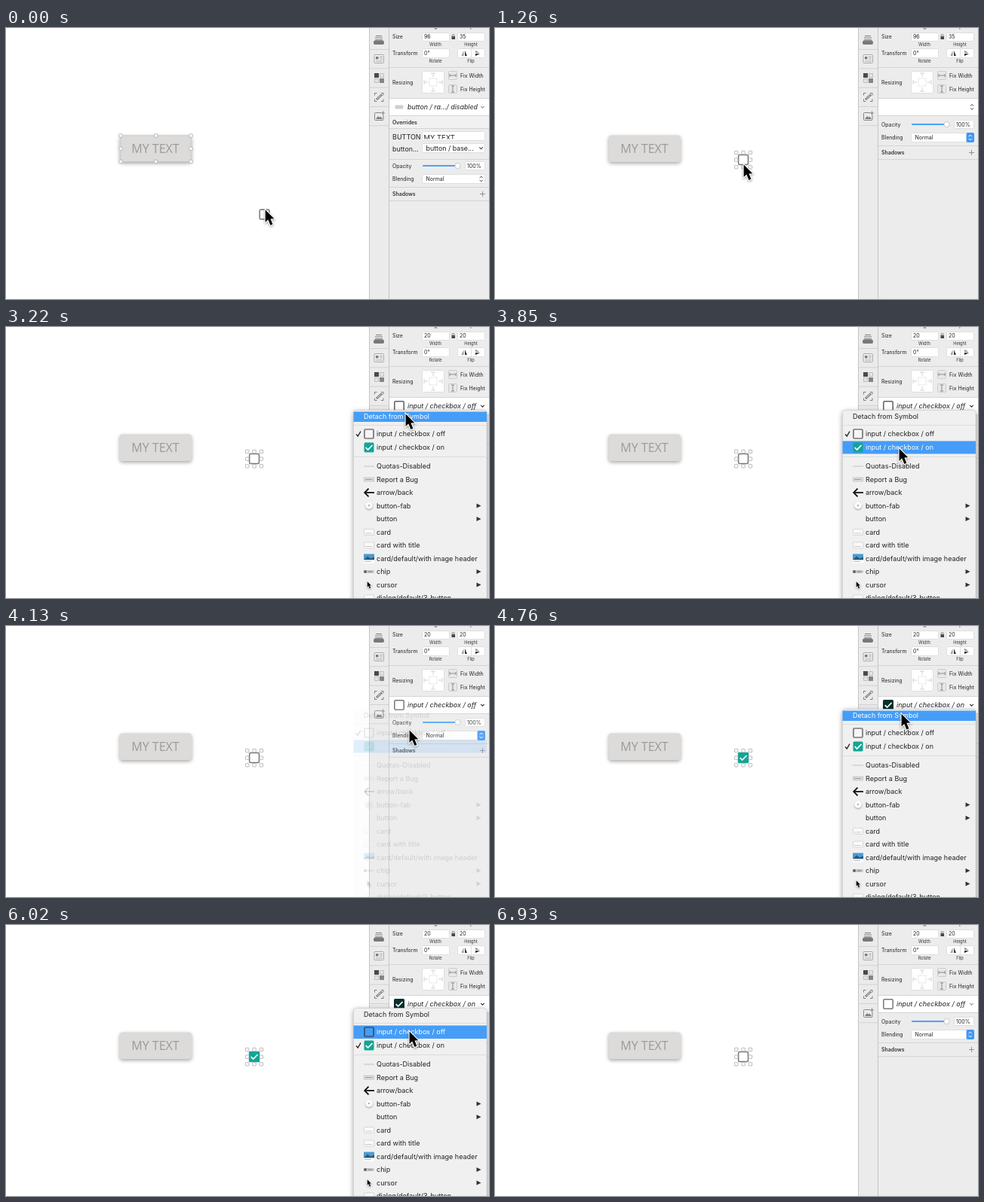
An HTML page with a canvas for the animation above (7000 ms loop, 640 by 360 pixels).

```html
<!DOCTYPE html>
<html lang="en">
<head>
<meta charset="utf-8">
<title>Symbol switching</title>
<style>
html, body { margin: 0; width: 100%; height: 100%; overflow: hidden; background: #fff; }
canvas { display: block; width: 640px; height: 360px; }
</style>
</head>
<body>
<canvas id="stage" width="640" height="360"></canvas>
<script>
const ctx = document.getElementById('stage').getContext('2d');
const LOOP = 7000, STEP = 70;
const TEAL = '#12a594', BLUE = '#459df8', INK = '#222', MID = '#777';

// Pointer tip: time, x, y
const POINTER = [
  [0, 343, 240], [700, 328, 176], [1050, 328, 176], [1190, 329, 180], [1260, 329, 180],
  [1890, 506, 121], [2030, 510, 120], [2590, 533, 103], [3080, 533, 104],
  [3220, 529, 114], [3570, 535, 160], [3850, 535, 160], [4130, 534, 137],
  [4480, 538, 115], [5110, 538, 116], [5250, 537, 126], [5390, 534, 140],
  [6160, 534, 140], [6650, 534, 364], [7000, 534, 364]
];

// Menu rows: center y, label, icon, has submenu
const MENU = [
  [119, 'Detach from Symbol'],
  [142, 'input / checkbox / off', 'off'],
  [160, 'input / checkbox / on', 'on'],
  [185, 'Quotas-Disabled', 'line'],
  [202.5, 'Report a Bug', 'bar'],
  [220, 'arrow/back', 'back'],
  [237.5, 'button-fab', 'fab', true],
  [255, 'button', '', true],
  [272.5, 'card', 'card'],
  [290, 'card with title', 'card'],
  [307.5, 'card/default/with image header', 'image'],
  [325, 'chip', 'chip', true],
  [342.5, 'cursor', 'cursor', true],
  [360, 'dialog/default/3-button', 'card']
];

function between(t, a, b) { return t >= a && t < b; }

function pointerAt(t) {
  const i = POINTER.findIndex(p => p[0] > t);
  const [t0, x0, y0] = POINTER[i - 1], [t1, x1, y1] = POINTER[i];
  const u = (t - t0) / (t1 - t0), k = u * u * (3 - 2 * u);
  return { x: x0 + (x1 - x0) * k, y: y0 + (y1 - y0) * k };
}

function text(str, x, y, size = 6.9, color = INK, style = '', align = 'left', family = 'Inter') {
  ctx.font = `${style} ${size}px ${family}, sans-serif`;
  ctx.fillStyle = color;
  ctx.textAlign = align;
  ctx.textBaseline = 'alphabetic';
  ctx.fillText(str, x, y);
}

function box(x, y, w, h, fill, stroke, r = 0, lw = 1) {
  ctx.beginPath();
  ctx.roundRect(x, y, w, h, r);
  if (fill) { ctx.fillStyle = fill; ctx.fill(); }
  if (stroke) { ctx.strokeStyle = stroke; ctx.lineWidth = lw; ctx.stroke(); }
}

function line(points, color, lw = 1) {
  ctx.beginPath();
  points.forEach(([x, y]) => ctx.lineTo(x, y));
  ctx.strokeStyle = color;
  ctx.lineWidth = lw;
  ctx.stroke();
}

function shape(points, color) {
  ctx.beginPath();
  points.forEach(([x, y]) => ctx.lineTo(x, y));
  ctx.closePath();
  ctx.fillStyle = color;
  ctx.fill();
}

function circle(x, y, r, fill, stroke) {
  ctx.beginPath();
  ctx.arc(x, y, r, 0, Math.PI * 2);
  ctx.fillStyle = fill;
  ctx.fill();
  if (stroke) { ctx.strokeStyle = stroke; ctx.lineWidth = 0.7; ctx.stroke(); }
}

function shadowed(color, blur, dy, draw) {
  ctx.save();
  ctx.shadowColor = color;
  ctx.shadowBlur = blur;
  ctx.shadowOffsetY = dy;
  draw();
  ctx.restore();
}

function field(x, y, w, h, r = 1) { box(x + .5, y + .5, w - 1, h - 1, '#fff', '#dadada', r, .8); }

function checkbox(x, y, on, size = 13.4, color) {
  const h = size / 2;
  if (!on) return box(x - h + .3, y - h + .3, size - .6, size - .6, '#fff', color || MID, 1.5, 1.5);
  box(x - h - .5, y - h - .5, size + 1, size + 1, color || TEAL, null, 1.5);
  line([[x - 4.3, y + .2], [x - 1.4, y + 3.1], [x + 4.5, y - 3]], '#fff', 1.7);
}

function handles(x0, y0, x1, y1) {
  const xs = [x0, (x0 + x1) / 2, x1], ys = [y0, (y0 + y1) / 2, y1];
  xs.forEach((x, i) => ys.forEach((y, j) => {
    if (i !== 1 || j !== 1) box(x - 2.2, y - 2.2, 4.4, 4.4, '#fff', '#aaa', .5, .8);
  }));
}

function arrow(x, y, s = 1) {
  ctx.save();
  ctx.translate(x, y);
  ctx.scale(s, s);
  ctx.beginPath();
  [[.6, 1.4], [.6, 18], [4.3, 14.6], [7.4, 22], [10.4, 20.8], [7.4, 13.4], [12.3, 13.2]]
    .forEach(p => ctx.lineTo(...p));
  ctx.closePath();
  ctx.strokeStyle = '#fff';
  ctx.lineWidth = 2.2;
  shadowed('rgba(0,0,0,.4)', 3, 1, () => ctx.stroke());
  ctx.fillStyle = '#000';
  ctx.fill();
  ctx.restore();
}

function upDown(x, y, color) {
  line([[x - 2, y - 1.3], [x, y - 3.5], [x + 2, y - 1.3]], color);
  line([[x - 2, y + 1.3], [x, y + 3.5], [x + 2, y + 1.3]], color);
}

function chevron(x, y, color) { line([[x - 2.3, y - 1.1], [x, y + 1.2], [x + 2.3, y - 1.1]], color, 1.1); }

function rule(y) { box(508, y, 132, 1, '#d4d4d4'); }

function canvasArea(s) {
  shadowed('rgba(0,0,0,.35)', 5, 2, () => box(150.5, 142.5, 95.5, 35.5, '#dcdbda', null, 4));
  text('MY TEXT', 198, 166.3, 16, '#9a9a9a', '', 'center', '"Open Sans"');
  if (s.buttonSelected) {
    box(152, 143, 93, 34.5, null, '#c4c4c4', 0, .7);
    handles(152, 143, 245, 177.5);
  }
  checkbox(s.box.x, s.box.y, s.on);
  if (!s.buttonSelected) handles(319.7, 165.5, 338.3, 184.8);
}

function toolStrip() {
  box(481, 0, 27, 360, '#ebebeb');
  box(481, 0, 1, 360, '#c6c6c6');
  box(507, 0, 1, 360, '#c6c6c6');
  for (let i = 0; i < 5; i++) box(482, 28 + i * 25.3, 25, 1, '#d2d2d2');
  const c = '#7c7c7c';
  line([[490, 10.5], [498, 10.5]], c);
  line([[489, 13], [499, 13]], c);
  shape([[489.5, 15], [498.5, 15], [500.5, 18], [487.5, 18]], '#999');
  box(487.5, 17.5, 13, 4, '#777', c, 1);

  box(488, 35.5, 12.5, 11, '#f1f1f1', '#a0a0a0', 1, .9);
  box(490, 38, 3.5, 3.5, c);
  [38.5, 41, 44].forEach((y, i) => line([[i < 2 ? 495 : 490, y], [499, y]], '#999', .9));

  box(488, 60, 6, 6, '#4a4a4a');
  box(495.5, 60.5, 5, 5, '#e4e4e4', '#b5b5b5', 0, .8);
  box(488.5, 67.5, 5, 5, '#e4e4e4', '#b5b5b5', 0, .8);
  box(495, 67, 6, 6, '#858585');

  // Corner marks around a pen
  for (const [x, y, dx, dy] of [[488.5, 86.5, 3, 3], [500, 86.5, -3, 3], [488.5, 97.5, 3, -3], [500, 97.5, -3, -3]])
    line([[x + dx, y], [x, y], [x, y + dy]], c);
  line([[491, 95], [498, 88.5]], c, 3);
  line([[492, 94], [497, 89.4]], '#eee', .9);

  box(488.5, 112.5, 11.5, 10, null, c, 1, .9);
  shape([[490, 121], [493, 117], [495, 119], [496.5, 117.5], [499, 121]], c);
  box(497, 110.5, 5, 5, '#ebebeb');
  line([[499.5, 110.5], [499.5, 115.5]], c);
  line([[497, 113], [502, 113]], c);
}

function geometryPanel(size) {
  text('X', 569.5, 2, 5.7, INK, '', 'center');
  text('Y', 616, 2, 5.7, INK, '', 'center');
  text('Size', 512, 14.4);
  field(551, 6, 37, 12);
  field(598, 6, 37, 12);
  text(size[0], 554, 14.4, 7);
  text(size[1], 601, 14.4, 7);
  box(590.5, 11, 4.5, 4, '#444', null, .5);
  box(591.3, 8.5, 2.6, 4, null, '#666', 1.2, .8);
  const label = (s, x, y) => text(s, x, y, 5.7, '#333', '', 'center');
  label('Width', 569, 24.2);
  label('Height', 616, 24.2);
  text('Transform', 512, 36.4);
  field(551, 27, 37, 13);
  text('0°', 554, 36.4, 7);
  field(598, 27, 37, 13, 2);
  line([[616.5, 28], [616.5, 39]], '#e2e2e2');
  shape([[606.5, 30], [606.5, 37], [603.5, 37]], '#999');
  shape([[608, 30], [608, 37], [611, 37]], '#333');
  shape([[622, 29.8], [627.5, 33], [622, 33]], '#999');
  shape([[622, 34], [628, 34], [622, 37.3]], '#333');
  label('Rotate', 569, 46);
  label('Flip', 616, 46);
  rule(52);
  text('Resizing', 512, 74.8);
  field(551, 57, 30, 30);
  ctx.setLineDash([1, 1]);
  box(561, 67, 10, 10, null, '#c8c8c8', 0, .8);
  ctx.setLineDash([]);
  for (let i = 0; i < 4; i++) {
    ctx.save();
    ctx.translate(566, 72);
    ctx.rotate(i * Math.PI / 2);
    line([[0, -12], [0, -7]], '#d2d2d2');
    line([[-3, -12], [3, -12]], '#d2d2d2');
    ctx.restore();
  }
  [63, 81].forEach((y, i) => {
    box(586.5, y - 5.5, 11, 11, '#e8e8e8', '#c4c4c4', 1, .8);
    ctx.save();
    ctx.translate(592, y);
    ctx.rotate(i * Math.PI / 2);
    line([[-4, 0], [4, 0]], MID, .8);
    line([[-4, -2], [-4, 2]], MID, .8);
    line([[4, -2], [4, 2]], MID, .8);
    ctx.restore();
    text(['Fix Width', 'Fix Height'][i], 602, y + 2.8);
  });
}

function symbolRow(s) {
  box(508, 93, 132, 24, '#fff');
  rule(93);
  rule(116);
  if (s.panel === 'loading') return upDown(632, 105, '#444');
  if (s.panel === 'button') {
    box(515.5, 102.5, 11, 5, '#cfcfcf', null, 1);
    text('button / ra.../ disabled', 532, 108.3, 8.9, INK, 'italic');
  } else {
    const dark = s.on ? '#07302c' : '#5f5f5f';
    checkbox(521, 105, s.on, 13, s.pressed ? dark : null);
    text('input / checkbox / ' + (s.on ? 'on' : 'off'), 532, 108.3, 9, INK, 'italic');
  }
  chevron(631.5, 105, s.hover ? '#333' : '#999');
}

function overrides() {
  box(508, 117, 132, 16, '#f1f1f1');
  text('Overrides', 512, 127.8, 6.9, '#333', '600');
  rule(133);
  text('BUTTON', 512, 148.2, 9);
  field(551, 137, 84, 13);
  ctx.save();
  ctx.beginPath();
  ctx.rect(552, 138, 82, 9.4);
  ctx.clip();
  text('MY TEXT', 553.5, 149, 9.4);
  ctx.restore();
  text('button...', 512, 163.5, 8.9);
  field(551, 153, 84, 13, 2);
  text('button / base...', 556.5, 162.6, 8.9);
  chevron(629.5, 159.5, '#444');
  rule(174);
}

function stylePanel(y, active) {
  text('Opacity', 512, y + 2.6);
  box(552, y - 1, 50, 2, '#c8c8c8', null, 1);
  box(552, y - 1, 45, 2, '#4ba3f7', null, 1);
  circle(598.5, y, 3.6, '#fff', '#b5b5b5');
  field(608, y - 6, 27, 12);
  text('100%', 611, y + 2.6, 7);
  text('Blending', 512, y + 19.6);
  field(551, y + 11, 84, 13, 2);
  text('Normal', 556.5, y + 19.6, 7);
  if (active) box(624.5, y + 11, 10.5, 13, '#4198f5', null, 2);
  upDown(629.7, y + 17.5, active ? '#fff' : '#444');
  rule(y + 28);
  text('Shadows', 512, y + 40, 6.9, '#333', '600');
  line([[628, y + 37.5], [635, y + 37.5]], '#888', .9);
  line([[631.5, y + 34], [631.5, y + 41]], '#888', .9);
  rule(y + 46);
}

function menuIcon(kind, y, lit) {
  const x = 481;
  if (kind === 'off') {
    box(x - 6, y - 6, 12, 12, lit ? BLUE : '#f6f6f6', lit ? '#34516f' : MID, 1.2, 1.7);
  } else if (kind === 'on') {
    checkbox(x, y, true, 12);
  } else if (kind === 'line') {
    line([[474, y], [488, y]], '#bbb', .9);
  } else if (kind === 'bar') {
    box(474.5, y - 2.5, 13, 5, '#ddd', '#bbb', 0, .7);
    line([[476, y], [485, y]], '#888', .8);
  } else if (kind === 'back') {
    line([[475.5, y], [488, y]], '#111', 1.8);
    line([[480.5, y - 5.3], [475.2, y], [480.5, y + 5.3]], '#111', 1.8);
  } else if (kind === 'fab') {
    shadowed('rgba(0,0,0,.35)', 2, 1, () => circle(x, y - .5, 5, '#fafafa'));
    circle(x, y - .5, 1, '#999');
  } else if (kind === 'card') {
    box(474.5, y - 4, 13, 8, '#fafafa', '#d0d0d0', .5, .8);
    line([[476, y + 1.5], [485, y + 1.5]], '#bbb', .8);
  } else if (kind === 'image') {
    box(474, y - 6, 14, 8, '#4b9bd0');
    shape([[474, y + 2], [479, y - 3], [483, y], [488, y - 2], [488, y + 2]], '#28597c');
    box(474, y + 2, 14, 4, '#fff');
    line([[475, y + 4], [484, y + 4]], '#aaa', .8);
  } else if (kind === 'chip') {
    box(474, y - 2, 14, 4, '#c4c4c4', null, 2);
    circle(476, y, 2, '#666');
    line([[480, y], [485, y]], MID, .9);
  } else if (kind === 'cursor') {
    arrow(478.5, y - 5, .45);
  }
}

function menu(s) {
  const panel = () => box(460.5, 110.5, 176.5, 260, '#f0f0f0', null, 4);
  ctx.save();
  ctx.globalAlpha = s.menu;
  // The shadow goes at once when the menu starts to fade
  if (s.pressed) {
    shadowed('rgba(0,0,0,.4)', 7, 2, panel);
    box(460.5, 110.5, 176.5, 260, null, '#c9c9c9', 4, .6);
  } else {
    panel();
  }
  [130, 172].forEach(y => box(461, y, 175.5, 1, '#dcdcdc'));
  const spans = [[112.5, 126], [133.5, 151], [151.5, 168.5]];
  if (s.lit >= 0) {
    const [a, b] = spans[s.lit];
    box(460.5, a, 176.5, b - a, BLUE);
  }
  MENU.forEach(([y, label, icon, sub], i) => {
    const lit = i === s.lit;
    const washed = i === 0 && s.washed;
    text(label, i ? 491 : 474, y + 3.2, 9, lit ? '#fff' : washed ? '#dfdfdf' : INK);
    if (icon) menuIcon(icon, y, lit);
    if (sub) shape([[623.5, y - 3], [629.5, y], [623.5, y + 3]], '#333');
  });
  const current = s.on ? 2 : 1, y = MENU[current][0];
  line([[464, y + .3], [466.2, y + 3], [470, y - 3.4]], s.lit === current ? '#fff' : INK, 1.3);
  ctx.restore();
}

function fade(t, start) { return Math.max(0, Math.min(1, 1 - (t - start) / 212)); }

function stateAt(t) {
  const tip = pointerAt(t);
  const open1 = between(t, 2800, 4200), open2 = between(t, 4760, 6300);
  const menuAlpha = open1 ? fade(t, 3950) : open2 ? fade(t, 6080) : 0;
  let row = -1;
  if (between(tip.y, 112, 125.5)) row = 0;
  else if (between(tip.y, 133, 151)) row = 1;
  else if (between(tip.y, 151, 169)) row = 2;
  if (between(t, 3850, 4200)) row = 2;
  if (between(t, 6020, 6300)) row = 1;
  // The chosen row blinks once
  if (between(t, 3780, 3850) || between(t, 5880, 5950)) row = -1;
  const drag = Math.min(1, t / 700), k = drag * drag * (3 - 2 * drag);
  return {
    tip,
    menu: menuAlpha,
    lit: row,
    washed: between(t, 5210, 5320),
    pressed: menuAlpha === 1,
    on: between(t, 4200, 6300),
    hover: between(t, 2100, 6580),
    buttonSelected: t < 1190,
    panel: t < 1190 ? 'button' : t < 1330 ? 'loading' : 'checkbox',
    box: { x: 342.5 + (329 - 342.5) * k, y: 247.7 + (175 - 247.7) * k }
  };
}

function draw(t) {
  const s = stateAt(t);
  box(0, 0, 640, 360, '#fff');
  canvasArea(s);
  toolStrip();
  box(508, 0, 132, 360, '#ececec');
  geometryPanel(s.panel === 'checkbox' ? ['20', '20'] : ['96', '35']);
  symbolRow(s);
  if (s.panel === 'button') overrides();
  stylePanel(s.panel === 'button' ? 183 : 128, s.panel !== 'button');
  if (s.menu > 0) menu(s);
  if (s.tip.y < 362) arrow(s.tip.x, s.tip.y);
}

const start = performance.now();
function tick() {
  const t = (performance.now() - start) % LOOP;
  draw(Math.floor(t / STEP) * STEP);
  requestAnimationFrame(tick);
}
tick();
</script>
</body>
</html>
```
